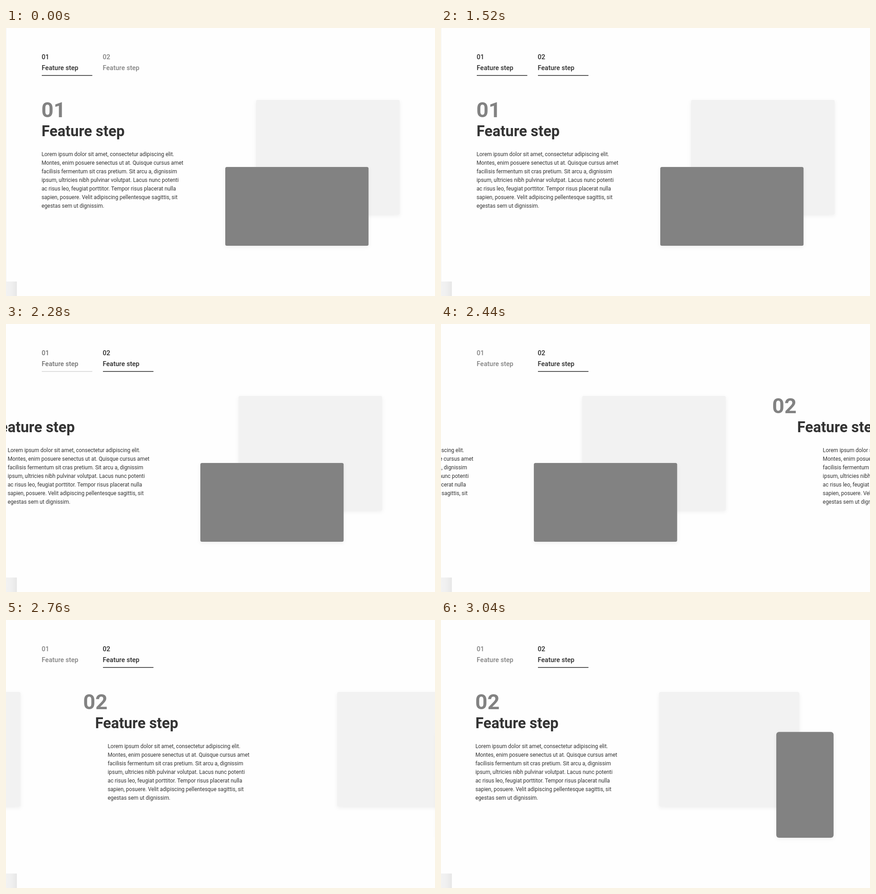
Write an HTML page that moves like this. It is 947 by 592 pixels and loops after 4.44 s.

```html
<!DOCTYPE html>
<html lang="en">
<head>
<meta charset="utf-8">
<title>Feature steps</title>
<style>
  html, body { margin: 0; width: 100%; height: 100%; overflow: hidden; background: #fefefe; }
  svg { display: block; width: 947px; height: 592px; font-family: Roboto, sans-serif; }
  .tab { font-size: 14.5px; font-weight: 500; }
  .num { font-size: 47px; font-weight: 700; fill: #828282; }
  .title { font-size: 32.7px; font-weight: 700; fill: #333; }
  .copy { font-size: 11.9px; fill: #333; }
  .big { fill: #f2f2f2; }
  .dark { fill: #828282; }
  .big, .dark { filter: drop-shadow(0 3px 4px rgba(0, 0, 0, .06)); }
</style>
</head>
<body>
<svg viewBox="0 0 947 592">
  <defs>
    <linearGradient id="shade">
      <stop offset="0" stop-color="#f2f2f2"/>
      <stop offset=".45" stop-color="#f0f0f0"/>
      <stop offset="1" stop-color="#e7e7e7"/>
    </linearGradient>
  </defs>
  <rect id="edge" width="1" height="560" fill="#f4f4f4"/>
  <rect y="560" width="24" height="32" fill="url(#shade)"/>

  <g id="tab1" class="tab">
    <text x="78.8" y="69.3">01</text>
    <text x="78.8" y="93">Feature step</text>
    <rect x="79" y="104" width="111.5" height="1.5"/>
  </g>
  <g id="tab2" class="tab">
    <text x="213.5" y="69.3">02</text>
    <text x="213.5" y="93">Feature step</text>
    <rect x="214" y="104" width="111.5" height="1.5"/>
  </g>

  <g data-part="big">
    <rect class="big" x="552" y="159" width="317" height="253" rx="3"/>
    <rect class="big" x="1568" y="159" width="309.5" height="253" rx="4"/>
  </g>
  <g data-part="dark">
    <rect class="dark" x="484" y="307" width="316.3" height="174" rx="3.5"/>
    <rect class="dark" x="1826" y="247.3" width="126.5" height="233.7" rx="6"/>
  </g>
  <g data-part="num" class="num">
    <text x="78" y="197.3">01</text>
    <text x="1162.5" y="197.3">02</text>
  </g>
  <g data-part="title" class="title">
    <text x="78.5" y="238.8">Feature step</text>
    <text x="1163" y="238.8">Feature step</text>
  </g>
  <g data-part="copy" class="copy"></g>
</svg>
<script>
  const LOOP = 4440, STEP = 40, TRAVEL = 1087;
  const $ = s => document.querySelector(s);

  const lines = [
    'Lorem ipsum dolor sit amet, consectetur adipiscing elit.',
    'Montes, enim posuere senectus ut at. Quisque cursus amet',
    'facilisis fermentum sit cras pretium. Sit arcu a, dignissim',
    'ipsum, ultricies nibh pulvinar volutpat. Lacus nunc potenti',
    'ac risus leo, feugiat porttitor. Tempor risus placerat nulla',
    'sapien, posuere. Velit adipiscing pellentesque sagittis, sit',
    'egestas sem ut dignissim.'
  ];
  for (const x of [78.4, 78.4 + TRAVEL - 2.5]) {
    lines.forEach((line, i) => {
      const text = document.createElementNS('http://www.w3.org/2000/svg', 'text');
      text.setAttribute('x', x);
      text.setAttribute('y', 282.5 + i * 19.05);
      text.textContent = line;
      $('[data-part=copy]').append(text);
    });
  }

  // Staggered slide: start, duration and the two x handles of the easing curve
  const parts = {
    num: [2078, 850, .3585, .6176],
    title: [2104, 853, .375, .595],
    copy: [2130, 861, .395, .56],
    dark: [2156, 907, .355, .54],
    big: [2180, 872, .346, .607]
  };

  const clamp = v => Math.min(1, Math.max(0, v));
  const mix = (a, b, k) => a + (b - a) * k;

  // cubic-bezier(a, 0, b, 1)
  function ease(x, a, b) {
    if (x <= 0 || x >= 1) return clamp(x);
    let lo = 0, hi = 1;
    for (let i = 0; i < 24; i++) {
      const t = (lo + hi) / 2, u = 1 - t;
      if (3 * a * t * u * u + 3 * b * t * t * u + t ** 3 < x) lo = t; else hi = t;
    }
    return lo * lo * (3 - 2 * lo);
  }

  const easeOut = (t, start) => 1 - (1 - clamp((t - start) / 360)) ** 2;

  function drawTab(id, active, width) {
    const tone = Math.round(mix(130, 42, active));
    const bar = $(id + ' rect');
    $(id).setAttribute('fill', `rgb(${tone},${tone},${tone})`);
    bar.setAttribute('width', 111.5 * width);
    bar.setAttribute('fill', '#2a2a2a');
    bar.setAttribute('opacity', active);
  }

  function draw(t) {
    const hover = easeOut(t, 1160);
    drawTab('#tab1', 1 - easeOut(t, 2080), 1);
    drawTab('#tab2', t < 1200 ? 0 : hover, t < 1200 ? 0 : hover);
    $('#edge').setAttribute('opacity', t < 2120 ? 1 : 0);
    for (const name in parts) {
      const [start, time, a, b] = parts[name];
      const x = -TRAVEL * ease((t - start) / time, a, b);
      $(`[data-part=${name}]`).setAttribute('transform', `translate(${x.toFixed(2)} 0)`);
    }
  }

  const begin = performance.now();
  function tick() {
    const t = (performance.now() - begin + 8) % LOOP;
    draw(Math.floor(t / STEP) * STEP);
    requestAnimationFrame(tick);
  }
  draw(0);
  requestAnimationFrame(tick);
</script>
</body>
</html>
```
